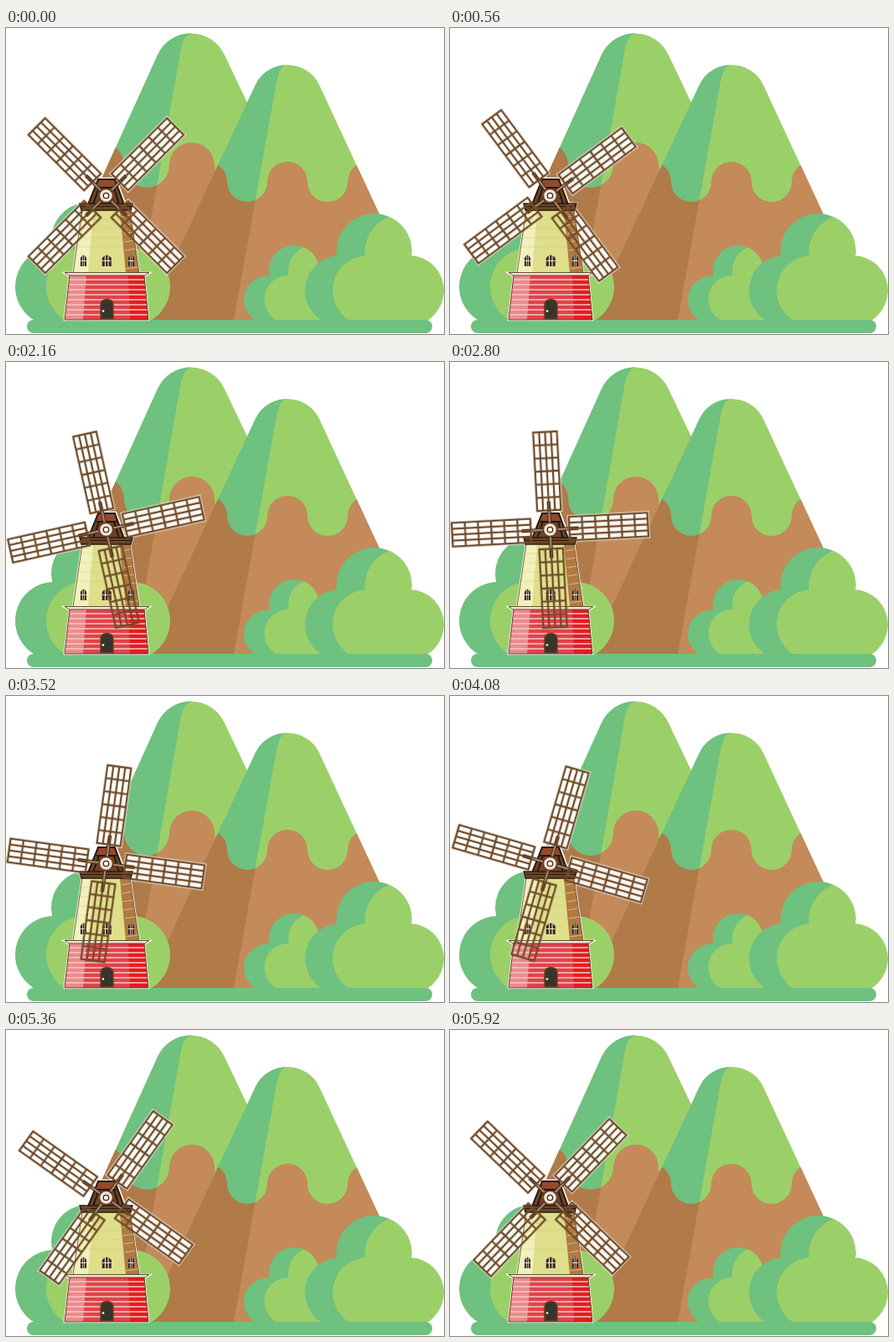
Recreate the animation shown at these times as an HTML page. Size 523 px wide and 366 px high, loop 6 s.

```html
<!DOCTYPE html>
<html lang="en">
<head>
<meta charset="utf-8">
<title>Windmill</title>
<style>
  html, body { margin: 0; width: 100%; height: 100%; overflow: hidden; background: #fff; }
  svg { display: block; width: 523px; height: 366px; }
  .dark { fill: #6ec17f; }
  .light { fill: #9bd069; }
  .soil { fill: #c48a59; }
  .soil-dark { fill: #b07a49; }
  /* Four equal sails: a quarter turn closes the loop. */
  .sails { transform-origin: 119.5px 200.5px; animation: turn 6s steps(75) -1ms infinite; }
  @keyframes turn {
    from { transform: rotate(45deg); }
    to { transform: rotate(135deg); }
  }
</style>
</head>
<body>
<svg viewBox="0 0 523 366">
  <defs>
    <path id="hill1" d="M38 349L181 32A44 44 0 0 1 261 32L412 349Z"/>
    <path id="hill2" d="M167 349L298 67.5A42.5 42.5 0 0 1 374 67.5L504.5 349Z"/>
    <path id="shade1" d="M0 349V0H221V7Q211 9 208 30L152 349Z"/>
    <path id="shade2" d="M140 349V0H336V43Q326 46 323 65L272 349Z"/>
    <path id="foot1" d="M0 349V164H87A27 27 0 0 1 141 164A27 27 0 0 0 195 164A27 27 0 0 1 249 164A27 27 0 0 0 303 164H420V349Z"/>
    <path id="foot2" d="M140 349V184H216A24 24 0 0 1 264 184A24 24 0 0 0 312 184A24 24 0 0 1 360 184A24 24 0 0 0 408 184A24 24 0 0 1 456 184H523V349Z"/>
    <clipPath id="inHill1"><use href="#hill1"/></clipPath>
    <clipPath id="inHill2"><use href="#hill2"/></clipPath>
    <clipPath id="inFoot1"><use href="#foot1"/></clipPath>
    <clipPath id="inFoot2"><use href="#foot2"/></clipPath>
    <clipPath id="top1"><circle cx="98" cy="253" r="44"/></clipPath>
    <clipPath id="top2"><circle cx="344" cy="290" r="30"/></clipPath>
    <clipPath id="top3"><circle cx="439.5" cy="267" r="45"/></clipPath>
    <clipPath id="aboveGround"><rect width="523" height="349.5"/></clipPath>

    <path id="body" d="M91 218H148L159 293H171L165 297L170 349H70L76 297L70 293H80Z"/>
    <path id="cap" d="M109 180H131L142 210H151L149 218H90L88 210H97Z"/>

    <g id="sail">
      <path d="M0-6V-34" stroke="#4a2f1c" stroke-width="4.4"/>
      <path d="M0-9V-33" stroke="#d8bda0" stroke-width="1.3"/>
      <path d="M-14.2-118V-22M-7.1-118V-22M0-118V-22M7.1-118V-22M14.2-118V-22" stroke="#6f4b29" stroke-width="2.3"/>
      <path d="M-15-117H15M-15-101.3H15M-15-85.6H15M-15-70H15M-15-54.3H15M-15-38.6H15M-15-23H15" stroke="#6f4b29" stroke-width="2.3"/>
    </g>
    <rect id="glow" x="-16.2" y="-119" width="32.4" height="98" fill="#fff" opacity=".92"/>
    <g id="window">
      <path d="M-5.5 14V4Q0-3 5.5 4V14Z" fill="#3b2a22"/>
      <path d="M-1.8 1V14M1.8 1V14M-5 7.5H5" stroke="#f2ead0" stroke-width="1.1"/>
    </g>
  </defs>

  <g clip-path="url(#inHill1)">
    <use href="#hill1" class="light"/>
    <use href="#shade1" class="dark"/>
    <use href="#foot1" class="soil"/>
    <use href="#shade1" class="soil-dark" clip-path="url(#inFoot1)"/>
  </g>
  <g clip-path="url(#inHill2)">
    <use href="#hill2" class="light"/>
    <use href="#shade2" class="dark"/>
    <use href="#foot2" class="soil"/>
    <use href="#shade2" class="soil-dark" clip-path="url(#inFoot2)"/>
  </g>

  <!-- The ground cuts off the bottoms of the bushes. -->
  <g clip-path="url(#aboveGround)">
    <g class="dark">
      <circle cx="98" cy="253" r="44"/>
      <rect x="11" y="263" width="150" height="93" rx="46.5"/>
      <circle cx="344" cy="290" r="30"/>
      <rect x="284" y="296.5" width="100" height="57" rx="28.5"/>
    </g>
    <g class="light">
      <circle cx="132" cy="253" r="44" clip-path="url(#top1)"/>
      <rect x="48" y="263" width="148" height="93" rx="46.5"/>
      <circle cx="367" cy="290" r="30" clip-path="url(#top2)"/>
      <rect x="308.5" y="296" width="90" height="57" rx="28.5"/>
    </g>
    <g class="dark">
      <circle cx="439.5" cy="267" r="45"/>
      <rect x="357" y="272" width="120" height="84" rx="42"/>
    </g>
    <circle class="light" cx="473.5" cy="268" r="45" clip-path="url(#top3)"/>
    <rect class="light" x="390" y="272" width="133" height="84" rx="42"/>
  </g>
  <rect class="dark" x="25" y="349" width="484" height="16" rx="8"/>

  <g class="sails"><g transform="translate(119.5 200.5)">
    <use href="#glow"/>
    <use href="#glow" transform="rotate(90)"/>
    <use href="#glow" transform="rotate(180)"/>
    <use href="#glow" transform="rotate(270)"/>
  </g></g>

  <g fill="#fff" stroke="#fff" stroke-width="2.6">
    <use href="#body"/>
    <use href="#cap"/>
  </g>

  <path fill="#dfdf8b" d="M91 218H148L159 293H80Z"/>
  <path fill="#f1f1bc" d="M91 218H104L98 293H80Z"/>
  <path fill="#b07a43" d="M136 218H148L159 293H143Z"/>
  <path d="M89 229H136M88 240H138M86 251H139M84 262H141" stroke="#cfc878" stroke-width=".7" opacity=".7"/>
  <path d="M138 226L149 224M139 236L151 234M140 246L152 244M141 256L153 254M142 266L155 264M142 288L158 286" stroke="#deb67c" stroke-width="1.2"/>
  <path d="M91 218L80 293M148 218L159 293" stroke="#6b4a2c" stroke-width=".9"/>

  <path fill="#e1434a" d="M76 295H165L170 349H70Z"/>
  <path fill="#ea8b8d" d="M76 295H96L92 349H70Z"/>
  <path fill="#e21d20" d="M146 295H165L170 349H148Z"/>
  <path d="M76 301H165M75 307H166M74 313H167M74 319H167M73 325H168M72 331H168M72 337H169M71 343H169" stroke="#f6c8c4" stroke-width="1.4"/>
  <path d="M76 296L70 349H170L165 296" fill="none" stroke="#5e3327" stroke-width=".9"/>
  <path d="M70 292.5H171L166 296H75Z" fill="#f4e3cf" stroke="#5a3b28" stroke-width=".9"/>

  <use href="#window" transform="translate(92.5 271) scale(.65 1)"/>
  <use href="#window" transform="translate(120.3 271)"/>
  <use href="#window" transform="translate(149.5 271) scale(.65 1)"/>
  <path d="M113 348V331Q113 325 120.5 324.5Q128 325 128 331V348Z" fill="#37352a" stroke="#6b3f22" stroke-width="1.5"/>
  <circle cx="116" cy="338.5" r="1.3" fill="#fff"/>

  <path fill="#6d4325" d="M110 181H130L141 211H98Z"/>
  <path fill="#94492a" d="M111 182H129L132 191H108Z"/>
  <path d="M109 181H131M108 191H132M110 181L98 211M130 181L141 211M111 191L104 211M129 191L135 211" fill="none" stroke="#24170f" stroke-width="2"/>
  <path d="M88 210H151L149 218H90Z" fill="#684629" stroke="#2c1b10" stroke-width="1.5"/>
  <path d="M90 213.5H149" stroke="#2c1b10" stroke-width="1"/>

  <g class="sails"><g transform="translate(119.5 200.5)">
    <use href="#sail"/>
    <use href="#sail" transform="rotate(90)"/>
    <use href="#sail" transform="rotate(180)"/>
    <use href="#sail" transform="rotate(270)"/>
  </g></g>

  <circle cx="119.5" cy="200.5" r="7.8" fill="#f6e3d3" stroke="#5a3b28" stroke-width="1"/>
  <circle cx="119.5" cy="200.5" r="3.2" fill="#fff" stroke="#3a241a" stroke-width="1.3"/>
</svg>
</body>
</html>
```
